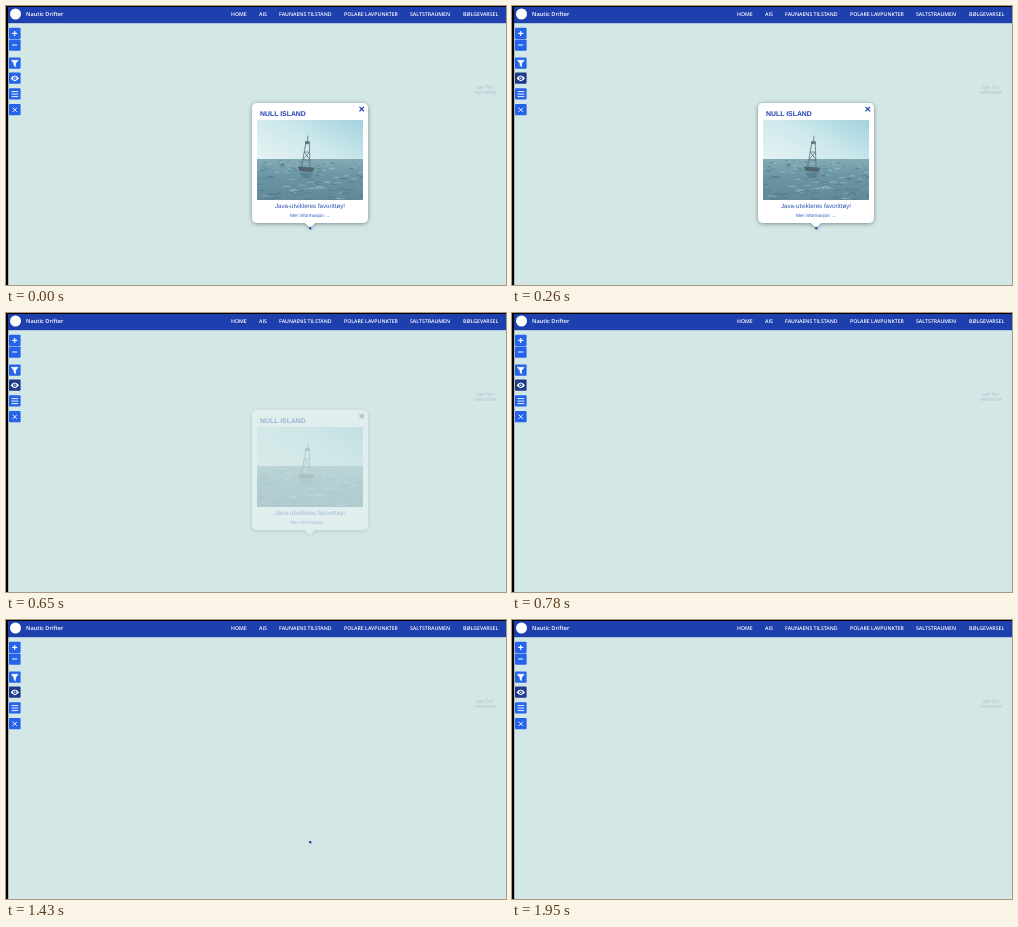
An HTML page for the animation above (2080 ms loop, 500 px wide and 279 px high).

```html
<!DOCTYPE html>
<html lang="no">
<head>
<meta charset="utf-8">
<title>Null Island</title>
<style>
  html, body { margin: 0; width: 100%; height: 100%; overflow: hidden; background: #d3e7e6; }
  svg { display: block; width: 100%; height: 100%; }
  text { text-rendering: geometricPrecision; }
  .bar { font: 600 5.2px "Open Sans", "Noto Sans", sans-serif; fill: #fff; }
  .bar .brand { font-size: 5.65px; }
  .card { font-family: "Liberation Sans", Arial, sans-serif; fill: #1e40af; }
  .icon { fill: none; stroke: #fff; stroke-width: 1.1; }
</style>
</head>
<body>
<svg viewBox="0 0 500 279" preserveAspectRatio="none">
  <defs>
    <linearGradient id="sky" x1="0" y1=".8" x2="1" y2=".1">
      <stop offset="0" stop-color="#e2f1f1"/>
      <stop offset=".5" stop-color="#cde8ec"/>
      <stop offset="1" stop-color="#a6d4de"/>
    </linearGradient>
    <linearGradient id="sea" x2="0" y2="1">
      <stop offset="0" stop-color="#83abb6"/>
      <stop offset=".4" stop-color="#6c96a5"/>
      <stop offset="1" stop-color="#618999"/>
    </linearGradient>
    <filter id="shadow" x="-10%" y="-10%" width="120%" height="120%">
      <feDropShadow dx="0" dy=".8" stdDeviation="2.2" flood-color="#000" flood-opacity=".42"/>
    </filter>
    <clipPath id="photo"><rect x="251" y="114" width="106" height="80"/></clipPath>
  </defs>

  <rect width="500" height="279" fill="#d3e7e6"/>
  <g font-family="Open Sans, sans-serif" font-size="5.6" fill="#afbfc8" text-anchor="middle">
    <text x="479" y="82.8">sør for</text>
    <text x="479" y="87.6">rennene</text>
  </g>
  <rect width="2.2" height="279"/>
  <rect x="2" width="498" height="17.2" fill="#1e40af"/>
  <rect width="500" height="1"/>

  <g class="bar" id="bar">
    <circle cx="9.5" cy="8" r="5.5"/>
    <text class="brand" x="20" y="10.2">Nautic Drifter</text>
  </g>

  <g id="buttons" fill="#2563eb"></g>
  <g class="icon">
    <path d="M6.2 27.4h5M8.7 24.9v5M6.2 39h5"/>
    <path d="M5.4 54.3h6.8l-2.6 3.2v3.2l-1.6-1.1v-2.1z" fill="#fff" stroke-width=".6"/>
    <path d="M4.6 72.3Q8.8 66.5 13 72.3Q8.8 78.1 4.6 72.3z" fill="#fff" stroke="none"/>
    <circle id="iris" cx="8.8" cy="72.3" r="1.7" stroke="none"/>
    <circle cx="8.8" cy="72.3" r=".7" fill="#fff" stroke="none"/>
    <path d="M5.5 85.6h6.8M5.5 88.1h6.8M5.5 90.6h6.8" stroke-width=".9"/>
    <path d="M6.7 101.7l4.2 4.2m0-4.2l-4.2 4.2" stroke-width=".9"/>
  </g>

  <g id="popup" class="card">
    <path filter="url(#shadow)" fill="#fff" d="M251 97H357a5 5 0 0 1 5 5V212a5 5 0 0 1-5 5H309L304 221.4L299 217H251a5 5 0 0 1-5-5V102a5 5 0 0 1 5-5z"/>
    <text x="254" y="110.2" font-size="6.9" font-weight="700">NULL ISLAND</text>
    <path d="M353.5 100.9l4.5 4.5m0-4.5l-4.5 4.5" stroke="#1e40af" stroke-width="1.25"/>
    <g clip-path="url(#photo)">
      <rect x="251" y="114" width="106" height="41" fill="url(#sky)"/>
      <rect x="251" y="153" width="106" height="41" fill="url(#sea)"/>
      <g id="waves" fill="none" stroke-width=".8"></g>
      <g transform="rotate(4 299.5 164)">
        <path d="M299.5 129.5V136M295.3 162L298 136H301.3L304 162M297 146H302.4M296 154H303.5M297 146L303.5 154M302.4 146L296 154" fill="none" stroke="#5f7784" stroke-width=".8"/>
        <rect x="297.2" y="135" width="4.6" height="3" fill="#647c88"/>
        <path d="M291.5 161H308.5L306.5 165.5H293.5z" fill="#50656f"/>
      </g>
      <path d="M293 166.5H307L303 172H297z" fill="#4d7181" opacity=".55"/>
    </g>
    <g text-anchor="middle">
      <text x="304" y="202" font-size="6.18" fill="#2a4fb2">Java-utvikleres favorittøy!</text>
      <text x="304" y="210.6" font-size="4.73" fill="#2858cc">Mer informasjon →</text>
    </g>
  </g>
  <path id="marker" d="M302.6 221h2.7v2.4h-1.6z" fill="#27479f"/>
</svg>
<script>
const LOOP = 2080;
const $ = id => document.getElementById(id);

function add(parent, tag, attrs, text = '') {
  const el = document.createElementNS('http://www.w3.org/2000/svg', tag);
  for (const key in attrs) el.setAttribute(key, attrs[key]);
  el.textContent = text;
  return parent.appendChild(el);
}

const menu = [
  [225, 'HOME'], [253, 'AIS'], [273, 'FAUNAENS TILSTAND'],
  [338, 'POLARE LAVPUNKTER'], [404, 'SALTSTRAUMEN'], [457, 'BØLGEVARSEL']
];
for (const [x, label] of menu) add($('bar'), 'text', { x, y: 10 }, label);

const buttons = [21.8, 33.6, 51.6, 66.6, 82.2, 98].map(y =>
  add($('buttons'), 'rect', { x: 3, y, width: 11.6, height: 11.2, rx: 1 }));
const eye = buttons[3];

// Short seeded wave strokes, longer towards the viewer
let seed = 17;
const random = () => (seed = seed * 16807 % 2147483647) / 2147483647;
for (let i = 0; i < 110; i++) {
  const depth = random();
  const x = 248 + random() * 106, y = 155 + depth * 39, w = 3 + depth * 6;
  add($('waves'), 'path', {
    d: `M${x} ${y}q${w / 2} ${-1 - depth} ${w} 0`,
    stroke: random() < .5 ? '#b4d0d6' : '#3f6b7d',
    opacity: .4 + random() * .35
  });
}

function draw(t) {
  const fade = t < 520 ? 1 : Math.max(0, 1 - (t - 510) / 200);
  const eyeColor = t < 260 ? '#2563eb' : '#1e3a8a';
  const marked = t < 520 || (t >= 1430 && t < 1950);
  $('popup').setAttribute('opacity', fade);
  eye.setAttribute('fill', eyeColor);
  $('iris').setAttribute('fill', eyeColor);
  $('marker').setAttribute('visibility', marked ? 'visible' : 'hidden');
}

const start = performance.now();
function tick() {
  draw((performance.now() - start) % LOOP);
  requestAnimationFrame(tick);
}
tick();
</script>
</body>
</html>
```
